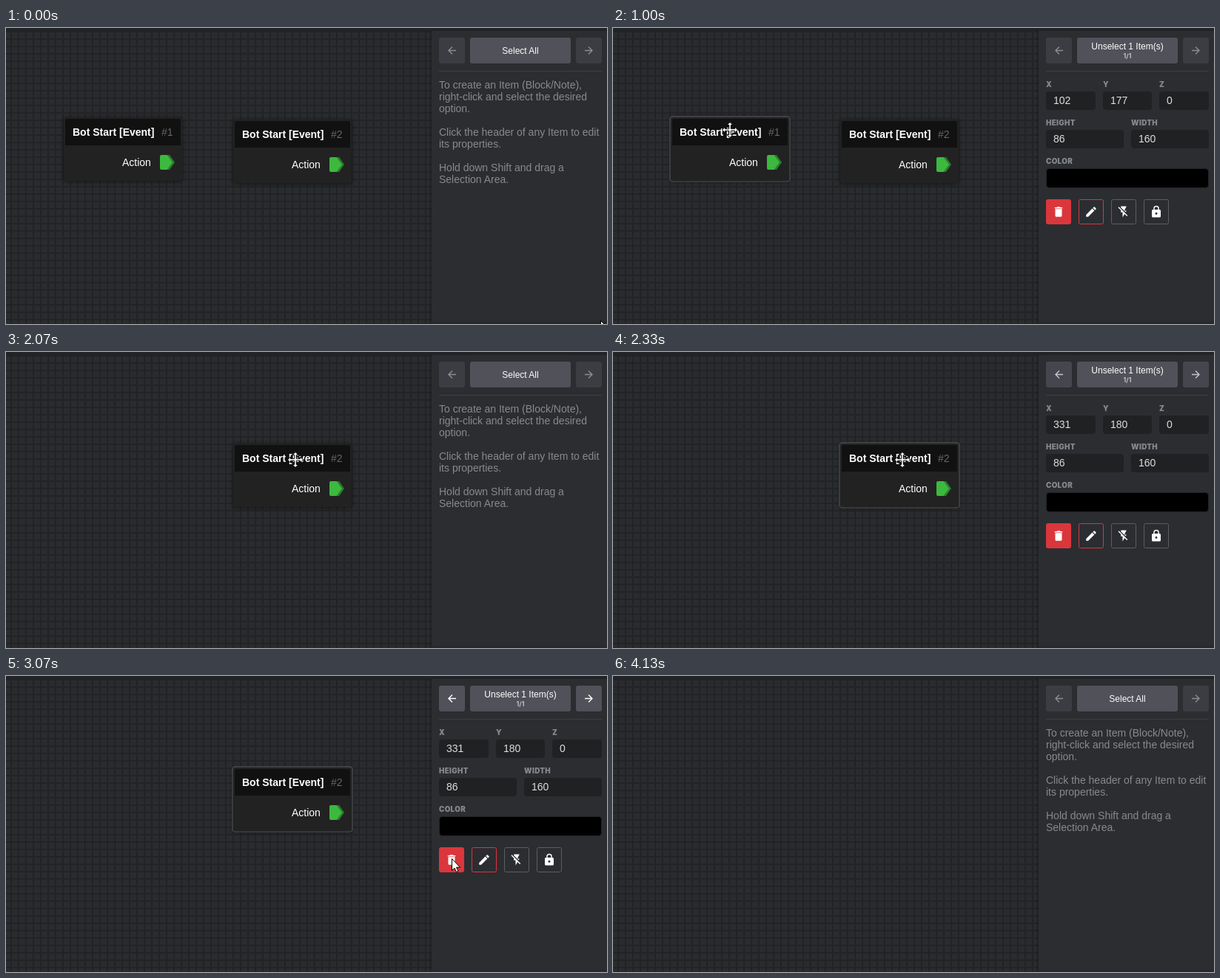
An HTML page that plays this animation: 812x401 px, repeating every 4.87 s.

```html
<!DOCTYPE html>
<html lang="en">
<head>
<meta charset="utf-8">
<title>Block editor</title>
<style>
  html, body { margin: 0; width: 100%; height: 100%; overflow: hidden; background: #232427; }
  svg { display: block; font: 14px "Liberation Sans", Arial, sans-serif; }
  .label { font: 900 9.8px Inter, sans-serif; letter-spacing: .35px; fill: #85888d; }
  .small { font-size: 12px; fill: #fff; text-anchor: middle; }
  .count { font: 800 8.5px Inter, sans-serif; fill: #b4b5ba; text-anchor: middle; }
  .value { fill: #dcddde; }
  .hint { fill: #88898d; }
  .title { font-weight: bold; fill: #fff; }
</style>
</head>
<body>
<svg id="stage" width="812" height="401" viewBox="0 0 812 401">
  <defs>
    <pattern id="grid" x="6" y="4" width="10" height="10" patternUnits="userSpaceOnUse">
      <path fill="#2a2b2e" d="M0 0h10v10H0z"/>
      <path fill="#222325" d="M0 0h10v2H2v8H0z"/>
    </pattern>
    <linearGradient id="edge"><stop stop-opacity="0"/><stop offset="1" stop-opacity=".25"/></linearGradient>
    <filter id="shadow" x="-20%" y="-20%" width="140%" height="140%">
      <feDropShadow dx="0" dy="1" stdDeviation="3" flood-opacity=".55"/>
    </filter>
  </defs>
  <path fill="url(#grid)" d="M0 0h576v401H0z"/>
  <path fill="url(#edge)" d="M571 0h4v401h-4z"/>
  <path fill="#2c2d31" d="M575 0h237v401H575z"/>
  <path fill="#222326" d="M0 0h812v4H0z"/>
  <path fill="#27282b" d="M575 398h237v3H575z"/>
  <g id="blocks"></g>
  <g id="panel">
    <rect x="627" y="13" width="136" height="35" rx="3" fill="#505159"/>
    <path fill="#3e3f43" d="M585 58h220v1H585z"/>
    <g class="arrow"></g>
    <g class="arrow" transform="matrix(-1 0 0 1 1390 0)"></g>
    <g id="help"></g>
    <g id="props"></g>
  </g>
  <path id="pointer" fill="#fff" stroke="#000" d="M.5.5V16.5L4 13.2 6.6 18.5 9 17.4 6.5 12.2H11.5Z"/>
  <path id="mover" fill="#fff" stroke="#000" stroke-linejoin="round"
    d="M0-10.5L4-6.5H1.3V-1.3H6.5V-4L10.5 0 6.5 4V1.3H1.3V6.5H4L0 10.5-4 6.5H-1.3V1.3H-6.5V4L-10.5 0-6.5-4V-1.3H-1.3V-6.5H-4Z"/>
</svg>
<script>
const LOOP = 4870, TICK = 200 / 3;
const $ = id => document.getElementById(id);
const text = (x, y, cls, s) => `<text x="${x}" y="${y}" class="${cls}">${s}</text>`;
const box = (x, y, w, h, style) => `<rect x="${x}" y="${y}" width="${w}" height="${h}" ${style}/>`;
const show = (el, on) => el.setAttribute('visibility', on ? 'inherit' : 'hidden');

// All times below are in ticks.
const blocks = [
  { id: 1, x: 78, y: 121, world: [102, 177, 0], selected: 15, removed: 23 },
  { id: 2, x: 307, y: 124, world: [331, 180, 0], selected: 34, removed: 49 },
];

$('blocks').innerHTML = blocks.map(b => `<g transform="translate(${b.x} ${b.y})">
  ${box(-1, -1, 162, 88, 'rx="4" fill="#222325" stroke="#4b4c50" stroke-width="2"')}
  ${box(0, 0, 160, 86, 'rx="3" fill="#212122" filter="url(#shadow)"')}
  <path fill="#111" d="M2 38V4q0-2 2-2h152q2 0 2 2v34z"/>
  ${text(12, 25, 'title', 'Bot Start [Event]')}
  <text x="132" y="25" fill="#666">#${b.id}</text>
  <text x="79" y="66" fill="#fff">Action</text>
  <path fill="#2a7d2c" d="M132 51h11l7 10-7 10h-11z"/>
  <path fill="#3cb93e" d="M132 51h7.500l7.500 10-7.500 10h-7.500q-2 0-2-2V53q0-2 2-2z"/>
</g>`).join('');
const blockEls = [...$('blocks').children];

const arrows = document.querySelectorAll('.arrow');
arrows.forEach(a => a.innerHTML = box(585, 13, 35, 35, 'rx="3" fill="#505159"') +
  '<path fill="none" stroke="#fff" stroke-width="1.4" d="M608 30.500H598.500M603 25.600L598 30.500 603 35.400"/>');

const hints = ['To create an Item (Block/Note),', 'right-click and select the desired', 'option.', '',
  'Click the header of any Item to edit', 'its properties.', '',
  'Hold down Shift and drag a', 'Selection Area.'];
$('help').innerHTML = text(695, 35, 'small', 'Select All') +
  hints.map((s, i) => text(585, 82 + 16 * i, 'hint', s)).join('');

const field = (x, y, w, name, value = '') => text(x, y, 'label', name) +
  box(x, y + 6, w, 25, 'rx="4" fill="#202123"') + text(x + 10, y + 23, 'value', value);
const icons = [
  'M6 19c0 1.100.9 2 2 2h8c1.100 0 2-.9 2-2V7H6zM19 4h-3.500l-1-1h-5l-1 1H5v2h14z',
  'M3 17.250V21h3.750L17.800 9.900l-3.750-3.750zM20.700 7q.6-.7 0-1.400l-2.300-2.300q-.7-.6-1.400 0l-1.900 1.800 3.750 3.750z',
  'M3.300 3L2 4.300l5 5V13h3v9l3.600-6.100L17.700 20 19 18.700zM17 10h-4l4-8H7v2.200l8.500 8.400z',
  'M18 8h-1V6A5 5 0 0 0 7 6v2H6q-2 0-2 2v10q0 2 2 2h12q2 0 2-2V10q0-2-2-2zM12 17a2 2 0 0 1 0-4 2 2 0 0 1 0 4zM15.100 8H8.900V6a3.100 3.100 0 0 1 6.200 0z',
];
const borders = ['#da373c', '#da373c', '#5d5e62', '#5d5e62'];
$('props').innerHTML = text(695, 29, 'small', 'Unselect 1 Item(s)') + text(695, 41, 'count', '1/1') +
  field(585, 80, 67, 'X') + field(662, 80, 66, 'Y') + field(738, 80, 67, 'Z') +
  field(585, 132, 105, 'HEIGHT', 86) + field(700, 132, 105, 'WIDTH', 160) +
  text(585, 184, 'label', 'COLOR') +
  box(585.5, 190.5, 219, 26, 'rx="4" fill="#000" stroke="#222326"') +
  icons.map((d, i) => box(585.5 + 44 * i, 232.5, 33, 33,
      `rx="2" fill="${i ? 'none' : '#da373c'}" stroke="${borders[i]}"`) +
    `<path fill="#fff" fill-rule="evenodd" transform="translate(${593 + 44 * i} 240) scale(.75)" d="${d}"/>`).join('');
const coords = [...$('props').querySelectorAll('.value')].slice(0, 3);

const even = u => (u + u * u * (3 - 2 * u)) / 2;
const easeIn = u => u ** 1.5;
const easeOut = u => 1 - (1 - u) ** 2;
// Each stop: tick, x, y and the easing used to get there.
const path = [
  [0, 803, 396], [8, 256, 232, even], [12, 158, 138, easeOut],
  [24, 158, 138, even], [28, 300, 172, easeIn], [30, 385, 160, easeOut], [31, 391, 146, even],
  [36, 391, 146, even], [41, 547, 258, easeIn], [46, 602, 247, easeOut],
  [54, 602, 247, even], [62, 82, 412, even],
];

function cursorAt(k) {
  const i = path.findIndex(p => p[0] > k);
  if (i < 0) return path[path.length - 1].slice(1, 3);
  const [t0, x0, y0] = path[i - 1], [t1, x1, y1, ease] = path[i];
  const u = ease((k - t0) / (t1 - t0));
  return [x0 + (x1 - x0) * u, y0 + (y1 - y0) * u];
}

function draw(ms) {
  const k = Math.floor((Math.floor(ms / 10) * 10 + 4) / TICK);
  const [x, y] = cursorAt(k).map(Math.round);
  let active = null, hover = false, glow = 0;

  blocks.forEach((b, i) => {
    const alive = k < b.removed, selected = alive && k >= b.selected;
    show(blockEls[i], alive);
    show(blockEls[i].firstElementChild, selected);
    if (selected) active = b;
    if (alive && x > b.x + 2 && x < b.x + 158 && y > b.y + 2 && y < b.y + 35) hover = true;
    const rise = Math.min(1, Math.max(0, (k - b.selected) / 2));
    const fall = Math.min(1, Math.max(0, (k - b.removed) / 3));
    glow = Math.max(glow, rise - fall);
  });

  arrows.forEach(a => a.setAttribute('opacity', .45 + .55 * glow));
  show($('help'), !active);
  show($('props'), active);
  if (active) coords.forEach((el, i) => el.textContent = active.world[i]);

  for (const id of ['pointer', 'mover']) {
    $(id).setAttribute('transform', `translate(${x} ${y})`);
    show($(id), hover === (id === 'mover'));
  }
}

function frame() {
  draw(performance.now() % LOOP);
  requestAnimationFrame(frame);
}
frame();
</script>
</body>
</html>
```
